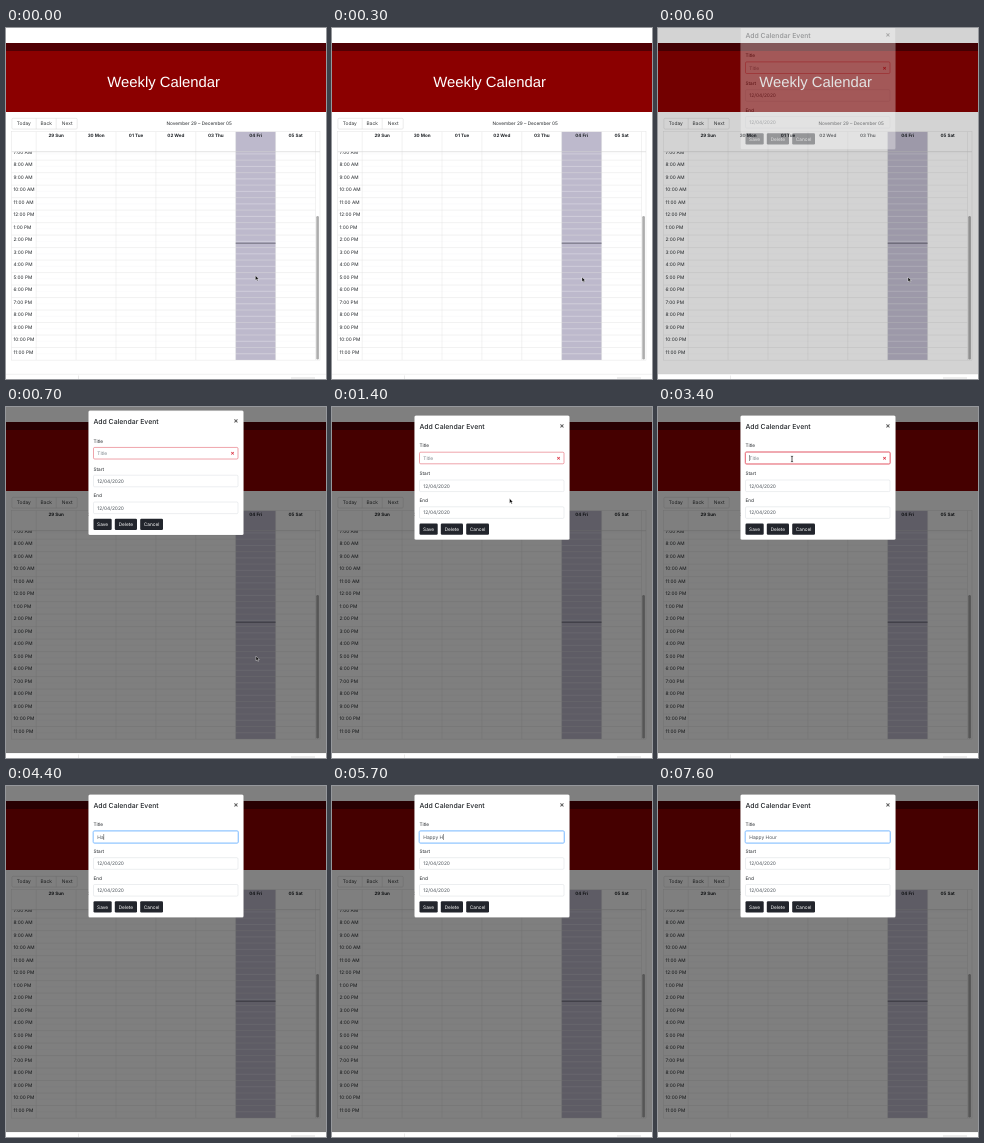
An HTML page for the animation above (8000 ms loop, 320 by 351 pixels).

```html
<!DOCTYPE html>
<html lang="en">
<head>
<meta charset="utf-8">
<title>Weekly Calendar</title>
<style>
  html, body { margin: 0; width: 100%; height: 100%; overflow: hidden; background: #fff; }
  svg { display: block; width: 320px; height: 351px; }
  text { font-family: Inter, Roboto, sans-serif; text-rendering: geometricPrecision; white-space: pre; }
  .banner { font-family: "Liberation Sans", Arial, sans-serif; }
</style>
</head>
<body>
<svg id="stage" viewBox="0 0 320 351">
  <clipPath id="body-clip"><rect x="5" y="123.7" width="310" height="209"/></clipPath>
  <g id="page">
    <rect width="320" height="351" fill="#fff"/>
    <rect y="15" width="320" height="8" fill="#500004"/>
    <rect y="23" width="320" height="61" fill="#8b0000"/>
  </g>
  <rect id="backdrop" width="320" height="346" fill="#000"/>
  <g id="modal">
    <rect id="panel" x="82.4" y="8.4" width="155.2" rx="1.5" fill="#fff" stroke="#000" stroke-opacity=".25" stroke-width=".3"/>
    <g id="lower"></g>
  </g>
  <path id="arrow" d="M0 0V4.6L1.1 3.6L1.9 5.3L2.7 4.9L1.9 3.3H3.3Z" fill="#000" stroke="#fff" stroke-width=".4"/>
  <path id="ibeam" d="M-1.1 -2.8Q0 -2.8 0 -2Q0 -2.8 1.1 -2.8M0 -2V2M-1.1 2.8Q0 2.8 0 2Q0 2.8 1.1 2.8" fill="none" stroke="#111" stroke-width=".7"/>
</svg>
<script>
const $ = id => document.getElementById(id);
const page = $('page'), modal = $('modal'), lower = $('lower');

function add(parent, tag, attrs) {
  const el = document.createElementNS('http://www.w3.org/2000/svg', tag);
  for (const key in attrs) el.setAttribute(key, attrs[key]);
  return parent.appendChild(el);
}
const rect = (parent, x, y, width, height, fill, more) =>
  add(parent, 'rect', { x, y, width, height, fill, ...more });
const line = (parent, x1, y1, x2, y2, stroke, width = .4) =>
  add(parent, 'line', { x1, y1, x2, y2, stroke, 'stroke-width': width });

// Places text so that its capitals are centred on cy.
function text(parent, str, x, cy, size, fill, more) {
  const el = add(parent, 'text', { x, y: cy + size * .364, 'font-size': size, fill, ...more });
  el.textContent = str;
  return el;
}
const middle = { 'text-anchor': 'middle' };
const bold = { ...middle, 'font-weight': 700 };

function drawPage() {
  text(page, 'Weekly Calendar', 157.6, 53.1, 14.85, '#fff', { ...middle, class: 'banner' });

  rect(page, 5.9, 90.3, 65.3, 10.8, '#fff', { rx: 1.2, stroke: '#ccc', 'stroke-width': .4 });
  line(page, 30.2, 90.3, 30.2, 101.1, '#ccc');
  line(page, 50.2, 90.3, 50.2, 101.1, '#ccc');
  [['Today', 17.8], ['Back', 40.2], ['Next', 61.2]].forEach(([s, x]) =>
    text(page, s, x, 95.7, 4.85, '#373a3c', middle));
  text(page, 'November 29 – December 05', 193.2, 95.7, 4.72, '#212529', middle);

  const colX = i => 30.2 + i * 39.9;
  const rowY = i => 332 - (17 - i) * 12.49;
  rect(page, colX(5), 103.8, 39.9, 228.2, '#bdb9cc');

  const grid = add(page, 'g', { 'clip-path': 'url(#body-clip)' });
  for (let i = 0; i < 17; i++) {
    const hour = 7 + i, y = rowY(i);
    line(grid, 5.7, y, 309.5, y, '#ddd');
    line(grid, 30.2, y + 6.25, 309.5, y + 6.25, '#f4f4f6', .35);
    text(grid, `${(hour + 11) % 12 + 1}:00 ${hour < 12 ? 'AM' : 'PM'}`, 7.4, y + 4.5, 4.75, '#212529');
  }
  for (let i = 0; i < 8; i++) line(page, colX(i), 103.8, colX(i), 332, '#ddd');
  rect(page, 5.7, 103.7, 308.3, 228.4, 'none', { stroke: '#ddd', 'stroke-width': .4 });
  line(page, 5.7, 123.7, 314, 123.7, '#d2d2d2', .6);
  ['29 Sun', '30 Mon', '01 Tue', '02 Wed', '03 Thu', '04 Fri', '05 Sat'].forEach((s, i) =>
    text(page, s, colX(i) + 20, 107.2, 4.55, '#212529', bold));

  line(page, colX(5), 215.2, colX(6), 215.2, '#4c4c58', .7);
  rect(page, 310.3, 188, 2.6, 143.5, '#adadad', { rx: 1.3 });

  line(page, 0, 346.3, 320, 346.3, '#e2e2e2', .5);
  line(page, 72.5, 347.5, 72.5, 351, '#d5d5d5', .5);
  rect(page, 285, 349, 24, 2, '#ededed');
}

function drawField(parent, label, labelY, boxY) {
  text(parent, label, 87.5, labelY, 4.7, '#212529');
  return rect(parent, 87.5, boxY, 144.5, 11.6, '#fff', { rx: 1.2, stroke: '#ced4da', 'stroke-width': .4 });
}

function drawModal() {
  text(modal, 'Add Calendar Event', 87.4, 19, 6.9, '#212529', { 'font-weight': 500 });
  text(modal, '×', 230, 18, 7.2, '#555', bold);
  const ring = rect(modal, 87, 44.7, 145.5, 12.6, 'none', { rx: 1.6, 'stroke-width': 1 });
  const box = drawField(modal, 'Title', 38.7, 45.2);
  const mark = text(modal, '×', 226.5, 51, 6, '#dc3545', bold);
  const value = text(modal, '', 91.3, 51.1, 4.85, '#495057');
  const caret = rect(modal, 91.3, 48, .45, 6, '#222');

  [['Start', 66.7, 73], ['End', 93.5, 99.8]].forEach(([label, labelY, boxY]) => {
    drawField(lower, label, labelY, boxY);
    text(lower, '12/04/2020', 91.3, boxY + 5.9, 4.85, '#495057');
  });
  [['Save', 87.5, 18.2], ['Delete', 108.8, 22.2], ['Cancel', 134.2, 22.8]].forEach(([s, x, w]) => {
    rect(lower, x, 116.6, w, 11.2, '#22252c', { rx: 1.2 });
    text(lower, s, x + w / 2, 122.2, 4.75, '#fff', middle);
  });
  return { ring, box, mark, value, caret };
}

drawPage();
const ui = drawModal();

const clamp = v => Math.min(1, Math.max(0, v));
const lerp = (a, b, p) => a + (b - a) * p;
const smooth = p => p * p * (3 - 2 * p);

// cubic-bezier(0, 0, .58, 1)
function easeOut(x) {
  let lo = 0, hi = 1;
  for (let i = 0; i < 20; i++) {
    const s = (lo + hi) / 2;
    if (1.74 * s * s * (1 - s) + s ** 3 < x) lo = s; else hi = s;
  }
  return 3 * lo * lo - 2 * lo ** 3;
}

const pointer = [
  [0, 249.4, 247.6], [300, 250, 249.2], [800, 250, 249.2], [1400, 177.6, 91.6],
  [2400, 177.6, 91.6], [2600, 138.6, 72.6], [2800, 138.6, 72.6], [3100, 134, 52]
];
function pointerAt(t) {
  const i = pointer.findIndex(p => p[0] > t);
  if (i < 0) return pointer[pointer.length - 1].slice(1);
  const [t0, x0, y0] = pointer[i - 1], [t1, x1, y1] = pointer[i];
  const p = smooth((t - t0) / (t1 - t0));
  return [lerp(x0, x1, p), lerp(y0, y1, p)];
}

const TYPED = 'Happy Hour';
const keyTimes = [4000, 4400, 4600, 4800, 5000, 5400, 5700, 6000, 6200, 7100];
const RED = [220, 53, 69], BLUE = [128, 189, 255], BLUE_RING = [0, 123, 255];
const mix = (a, b, p) => `rgb(${a.map((v, i) => Math.round(lerp(v, b[i], p)))})`;
const show = (el, on) => el.setAttribute('visibility', on ? 'inherit' : 'hidden');

function render(t) {
  const fade = clamp((t - 548) / 150);
  const drop = -15.5 * (1 - easeOut(clamp((t - 548) / 300)));
  $('backdrop').setAttribute('opacity', fade * .5);
  modal.setAttribute('opacity', fade);
  modal.setAttribute('transform', `translate(0 ${drop})`);

  const valid = t >= 4200;
  lower.setAttribute('transform', `translate(0 ${valid ? -1.3 : 0})`);
  $('panel').setAttribute('height', valid ? 123.1 : 124.4);
  show(ui.mark, !valid);

  const focus = clamp((t - 3230) / 150);
  const blue = clamp((t - 4100) / 200);
  ui.ring.setAttribute('stroke', mix(RED, BLUE_RING, blue));
  ui.ring.setAttribute('stroke-opacity', focus * .35);
  ui.box.setAttribute('stroke', mix(RED, BLUE, blue));
  ui.box.setAttribute('stroke-width', lerp(.45, .6, focus));

  const count = keyTimes.filter(k => t >= k).length;
  ui.value.textContent = count ? TYPED.slice(0, count) : 'Title';
  ui.value.setAttribute('fill', count ? '#495057' : '#7b838a');
  const width = count ? ui.value.getSubStringLength(0, count) : 0;
  ui.caret.setAttribute('x', 91.3 + width);
  const lastKey = count ? keyTimes[count - 1] : 3300;
  show(ui.caret, t >= 3300 && t - lastKey < 500);

  const [x, y] = pointerAt(t);
  const overField = t >= 3000;
  for (const id of ['arrow', 'ibeam']) $(id).setAttribute('transform', `translate(${x} ${y})`);
  show($('arrow'), !overField);
  show($('ibeam'), overField && t < 4000);
}

// The picture advances ten times a second; the small lead absorbs frame latency.
function tick() {
  render(Math.floor((performance.now() + 20) / 100) * 100 % 8000);
  requestAnimationFrame(tick);
}
tick();
</script>
</body>
</html>
```
